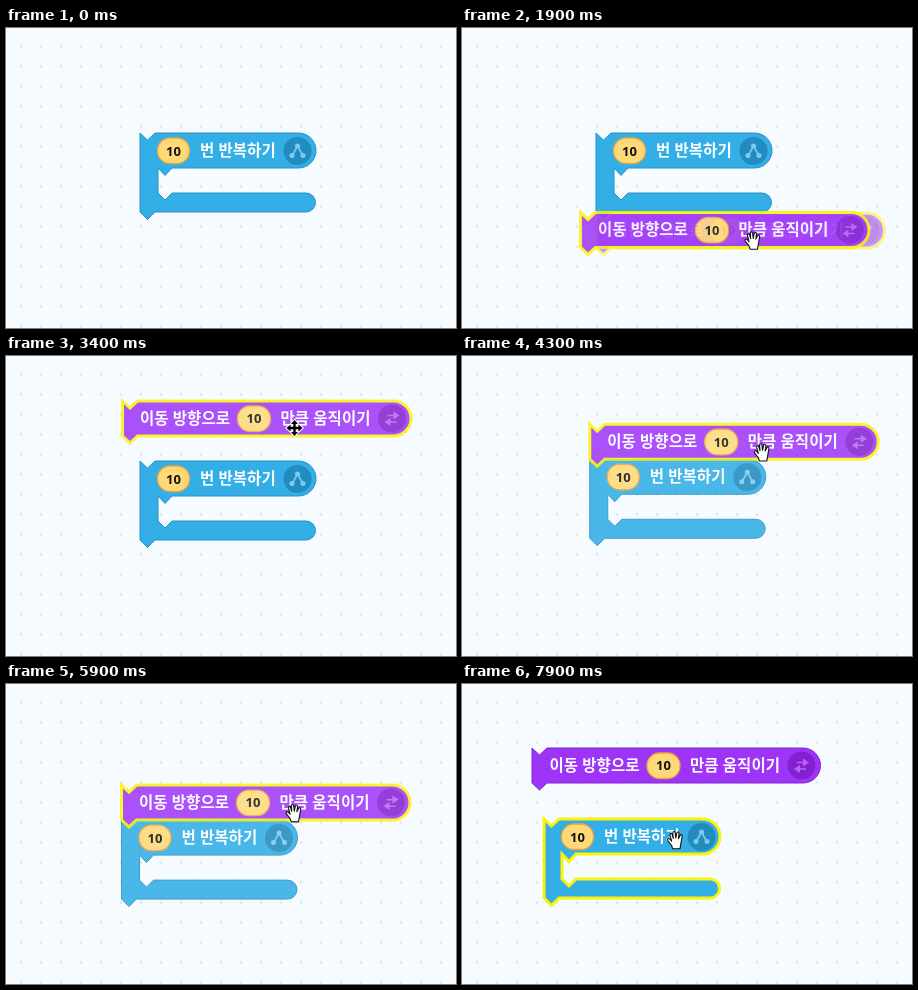
Recreate the animation shown at these times as an HTML page. Size 450x300 px, loop 8000 ms.

```html
<!DOCTYPE html>
<html lang="ko">
<head>
<meta charset="utf-8">
<title>Block coding</title>
<style>
  html, body { margin: 0; height: 100%; overflow: hidden; background: #f6fbff; }
  svg { display: block; width: 100vw; height: 100vh; }
  .label { font: bold 15.5px "Noto Sans CJK KR", "Noto Sans CJK", "Noto Sans CJK JP", sans-serif; fill: #fff; }
  .num { font: 600 13px "Noto Sans", sans-serif; fill: #111; text-anchor: middle; }
  .field { fill: #ffd977; stroke: #eda53c; stroke-width: 1.3; }
  #move .body { fill: #9d34f8; stroke: #8228cc; }
  #loop .body { fill: #33aee6; stroke: #2a90c2; }
  #move.selected .body, #loop.selected .body { stroke: #fbf30c; stroke-width: 3; }
</style>
</head>
<body>
<svg viewBox="0 0 450 300">
  <defs>
    <pattern id="dots" x="5" y="8" width="20" height="20" patternUnits="userSpaceOnUse">
      <circle cx="10" cy="10.5" r="1.3" fill="#dce3ea"/>
      <path d="M0 0h1v1h-1zM9.5 0h1v1h-1zM0 10h1v1h-1z" fill="#e6edf3"/>
    </pattern>
  </defs>
  <rect width="450" height="300" fill="url(#dots)"/>

  <g id="loop">
    <path class="body" d="M0 0l7.5 7 7.5-7H158.5a17.5 17.5 0 0 1 0 35H32l-7 7.5-7-7.5V60l7 7 7-7H166a9.5 9.5 0 0 1 0 19H15l-7.5 7.5L0 79Z"/>
    <rect class="field" x="17.5" y="5" width="32" height="25.5" rx="12.5"/>
    <text class="num" x="33.5" y="22.5">10</text>
    <text class="label" x="60" y="22.5">번 반복하기</text>
    <circle cx="157.5" cy="18" r="14" fill="#238cbf"/>
    <g fill="#7accf1">
      <path d="M152.500 22l5-9 5 9" fill="none" stroke="#7accf1" stroke-width="1.6"/>
      <circle cx="157.500" cy="13" r="2.5"/><circle cx="152" cy="22.500" r="2.5"/><circle cx="163" cy="22.500" r="2.5"/>
    </g>
  </g>

  <use id="ghost" href="#move-shape" opacity=".5"/>

  <g id="move">
    <g id="move-shape">
      <path class="body" d="M0 0l7.5 7 7.5-7H271a17.5 17.5 0 0 1 0 35H15l-7.5 7-7.5-7Z"/>
      <rect class="field" x="115" y="5" width="33" height="25.5" rx="12.5"/>
      <rect id="mark" x="123.5" y="9.5" width="16" height="16" fill="#b9c79d"/>
      <text class="num" x="131.5" y="22.300">10</text>
      <text class="label" x="17.5" y="22.5">이동 방향으로</text>
      <text class="label" x="158" y="22.5">만큼 움직이기</text>
      <circle cx="269.5" cy="17.5" r="14" fill="#8420d2"/>
      <path d="M265 13.800h6v-3.300l6 4-6 4v-3.200h-6zM274 20.300h-6v-3.300l-6 4 6 4v-3.200h6z" fill="#b168f0"/>
    </g>
  </g>

  <g id="cursor">
    <path id="arrows" d="M0-8l3.500 4H1.200v2.800H4v-2.300L8 0 4 3.500V1.200H1.200V4h2.300L0 8l-3.500-4h2.300V1.200H-4v2.300L-8 0l4-3.500v2.300h2.800V-4h-2.300Z" stroke="#fff" stroke-width="2" paint-order="stroke"/>
    <path id="hand" transform="translate(1 1) scale(1.1)" d="M-3 8L-4 5-7.500.5c-.7-1.600 1-2.400 2-1.200L-4 1-5.500-4.500c-.3-1.600 1.600-2 2-.5l1 3.500-.4-5c0-1.700 2-1.700 2.200 0l.5 4.700.9-4.500c.4-1.600 2.300-1.200 2.100.4l-.6 4.700 1.500-3c.8-1.300 2.300-.5 1.900.9L4.500 3 3.600 8Z" fill="#fff" stroke="#111" stroke-linejoin="round"/>
  </g>
</svg>
<script>
const $ = id => document.getElementById(id);
const LOOP = 8000, STEP = 100, LIFT = 1300, JOIN = 4200, REST = 6600, PULL = 7000;
const HOME = [134, 105], SLOTS = [[134, 185], [134, 70]];

// turning points of the drag: time, x, y
const drag = [
  [0, 134, 308], [800, 131, 184], [1000, 130.5, 200], [1200, 130.5, 200],
  [2100, 115, 180], [2500, -16, 128], [2900, 85, 18], [3400, 116.5, 45],
  [3700, 131, 58], [JOIN, ...SLOTS[1]], [5000, 84, 56], [5200, 85, 73.5],
  [5600, 135, 117], [REST, 70, 64]
];

const mix = (a, b, f) => a.map((v, i) => v + (b[i] - v) * f);
const add = (a, b) => mix(a, [a[0] + b[0], a[1] + b[1]], 1);

function dragAt(t) {
  const i = drag.findIndex(k => k[0] > t);
  if (i < 0) return drag.at(-1).slice(1);
  const [t0, ...a] = drag[i - 1], [t1, ...b] = drag[i];
  return mix(a, b, (t - t0) / (t1 - t0));
}

function loopAt(t, block) {
  if (t < JOIN) return HOME;
  const joined = add(block, [0, 35]);
  const f = Math.max(0, (t - PULL) / 900);
  return mix(joined, [82, 135], f * (2 - f));
}

const place = (id, [x, y]) => $(id).setAttribute("transform", `translate(${x} ${y})`);
const show = (id, on) => $(id).style.display = on ? "" : "none";

function draw(now) {
  const t = Math.floor(now % LOOP / STEP) * STEP;
  const block = dragAt(t), loop = loopAt(t, block);
  const pulling = t >= PULL, dragging = t < REST;

  place("move", block);
  place("loop", loop);
  place("cursor", pulling ? add(loop, [131, 20]) : add(block, [t < LIFT ? 185.5 : 172, 27]));

  // preview where the block would snap
  const slot = t < JOIN && SLOTS.find(([x, y]) => Math.hypot(block[0] - x, block[1] - y) < 24);
  show("ghost", slot);
  if (slot) place("ghost", slot);

  $("move").classList.toggle("selected", !pulling);
  $("loop").classList.toggle("selected", pulling);
  $("move").style.opacity = dragging ? .85 : 1;
  $("loop").style.opacity = dragging && t >= JOIN ? .88 : 1;
  show("mark", !dragging && !pulling);

  const arrows = t < LIFT || t > 3000 && t < 3900;
  show("arrows", arrows);
  show("hand", !arrows);
}

const start = performance.now();
(function tick() {
  draw(performance.now() - start);
  requestAnimationFrame(tick);
})();
</script>
</body>
</html>
```
